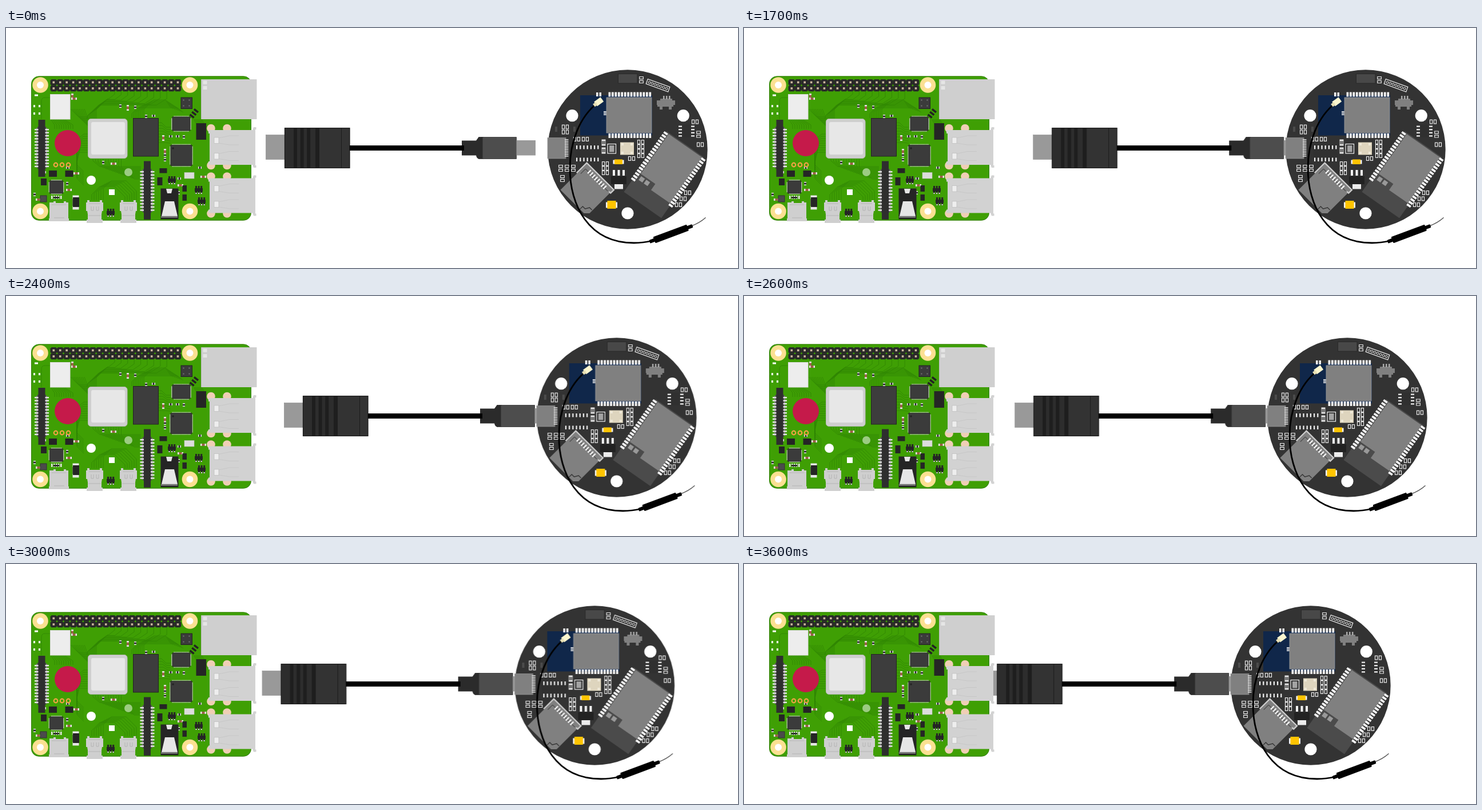
An HTML page for the animation above (5600 ms loop, 1280 by 421 pixels).

```html
<!DOCTYPE html>
<html lang="en">
<head>
<meta charset="utf-8">
<title>Connecting two boards</title>
<style>
html, body { margin: 0; width: 100%; height: 100%; overflow: hidden; background: #fff; }
svg { display: block; width: 100vw; height: 100vh; }
#cable { animation: cable 5600ms infinite; }
#round { animation: round 5600ms infinite; }
/* 6.4px every 100ms: the cable reaches the round board, then both slide left */
@keyframes cable {
  0% { transform: translateX(0); }
  17.85% { transform: translateX(0); animation-timing-function: steps(8, start); }
  32.14% { transform: translateX(51.2px); }
  39.28% { transform: translateX(51.2px); animation-timing-function: steps(15, start); }
  66.07%, 100% { transform: translateX(-44.8px); }
}
@keyframes round {
  0% { transform: translateX(0); }
  39.28% { transform: translateX(0); animation-timing-function: steps(15, start); }
  66.07%, 100% { transform: translateX(-96px); }
}
</style>
</head>
<body>
<svg viewBox="0 0 1280 421" preserveAspectRatio="none">
  <g id="cable"></g>
  <g id="pi"></g>
  <g id="round"></g>
</svg>
<script>
const dark = '#252525', chip = '#3b3b3b', grey = '#808080', metal = '#cfcfcf', white = '#f2f2f2';

const rect = (x, y, w, h, fill, more = '') =>
  `<rect x="${x}" y="${y}" width="${w}" height="${h}" fill="${fill}" ${more}/>`;
const disc = (x, y, r, fill, more = '') =>
  `<circle cx="${x}" cy="${y}" r="${r}" fill="${fill}" ${more}/>`;
const path = (d, fill, more = '') => `<path d="${d}" fill="${fill}" ${more}/>`;
const line = (d, color, width) => path(d, 'none', `stroke="${color}" stroke-width="${width}"`);
const edge = (color, width = 1) => `stroke="${color}" stroke-width="${width}"`;
const turn = (x, y, angle, body) =>
  `<g transform="translate(${x} ${y}) rotate(${angle})">${body}</g>`;
const rep = (n, f) => Array.from({ length: n }, (_, i) => f(i)).join('');
const pins = (x, y, n, dx, dy, w, h, fill) =>
  rep(n, i => rect(x + dx * i, y + dy * i, w, h, fill));
// Calls f on the four corners of a box
const corners = (x, y, w, h, f) => rep(4, i => f(x + (i % 2) * w, y + (i >> 1) * h));
const put = (id, parts) => { document.getElementById(id).innerHTML = parts.join(''); };

let seed = 7;
const random = () => (seed = seed * 16807 % 2147483647) / 2147483647;

/* ---- Cable ---- */
put('cable', [
  rect(454.5, 187.5, 34, 43, '#999', edge('#858585', .6)),
  rect(487.5, 175.5, 113.5, 70, '#333', edge('#161616', 1.2)),
  rect(488, 176, 60, 69, '#2d2d2d'),
  pins(503, 176, 3, 11.6, 0, 6, 69, '#1e1e1e'), rect(541, 176, 7, 69, '#1e1e1e'),
  line('M586.5 176v69', '#1c1c1c', 1),
  path('M797 197.5H822L826 192Q828 191 831 191H835V229.5H827Q823 229 822 223.5H797Z', '#2b2b2b'),
  rect(833.5, 191.5, 59, 38, '#4d4d4d'),
  line('M826 191.5H892.5V229.5H826', '#303030', .8),
  rect(601, 206, 200, 9, '#000'),
  rect(892.5, 197, 33.5, 26.5, '#999')
]);

/* ---- Green board ---- */
const traces = line(
  rep(9, i => `M${190 + i * 11.4} 112v${4 + i}l-${10 + i} ${8 + i * .4}H${178 - i * 2}L${158 - i * 2} ${143 + i * 1.4}V159`) +
  rep(8, i => `M${220 + i * 3} 158v-${8 + i}l${10 + i} -${10 + i}H${300 - i * 3}l10 ${8 + i}`) +
  rep(9, i => `M${79 + i * 3} 161l${6 + i} 9V177M${113 + i * 3} 142l14 ${14 + i * 3}H143`) +
  rep(12, i => `M${152 + i * 4.5} 230v${3 + i}l${12 + i} ${10 + i}H236`) +
  rep(9, i => `M143 ${186 + i * 4}H${136 - i}l-${12 - i} ${10 + i}V${240 + i * 3}l12 12`) +
  rep(8, i => `M267 ${166 + i * 5}h${5 + i}l8 ${8 - i}H288M${328 + i * 2} 160l14 22`) +
  rep(6, i => `M${150 + i * 4} 302v-${10 + i * 2}l14 -14H${190 + i * 4}l18 18V302`) +
  'M62 160V128Q62 122 68 122H77', '#2f8503', .75);

const header = rep(40, i => {
  const x = 77.6 + (i % 20) * 11.43, y = i < 20 ? 90 : 100.6;
  return path(`M${x + 2} ${y}h7.5l2.1 2.2v6.3l-2.1 2.2h-7.5l-2.1 -2.2v-6.3z`, '#292929') +
    rect(x + 3.9, y + 3.5, 3.6, 3.6, '#c9b59c');
});

// Chip with a row of legs on all four sides
const quad = (x, y, w, h, n) =>
  pins(x + 2.5, y - 2, n, (w - 4) / n, 0, 1.3, h + 4, '#ccc') +
  pins(x - 2, y + 2.5, n, 0, (h - 4) / n, w + 4, 1.3, '#ccc') +
  rect(x, y, w, h, chip, edge(dark, .8));

// Two-ended surface part
const smd = (x, y, w, h, fill) => rect(x, y, w, h, '#e6e6e6') +
  (w > h ? rect(x + w / 4, y, w / 2, h, fill) : rect(x, y + h / 4, w, h / 2, fill));

// A loose row or column of surface parts
const scatter = (x, y, n, dx, dy) => rep(n, i => {
  const brown = random() < .45, wide = random() < .5, w = brown ? 10 : 6;
  return smd(x + dx * i, y + dy * i, wide ? w : 4, wide ? 4 : w, brown ? '#9a6047' : '#333');
});

// Small black part with three legs above and below
const legs = (x, y) =>
  pins(x - 6, y - 7, 3, 4.6, 0, 3, 14, dark) + rect(x - 7, y - 3, 14, 6, dark) +
  pins(x - 5.6, y + 5, 3, 4.6, 0, 2.2, 2, '#ddd');

const ribbon = (x, y, h, barY, barH) =>
  rect(x + 3, y, 19, h, '#777') + rect(x + 5, y - 2, 15, h + 4, '#4a4a4a') +
  pins(x, y + 2, 13, 0, h / 13, 25, 2.4, '#e6e6e6') + rect(x + 6.5, barY, 12, barH, '#2e2e2e');

const usbPort = y =>
  corners(358.5, y + 2, 28, 65, (px, py) => disc(px, py, 7.3, '#efcfb5')) +
  path(`M354 ${y + 5}H431L433 ${y}H437.5V${y + 4}H436V${y + 67}H437.5V${y + 71}H433L431 ${y + 66}H354V${y + 60}H356V${y + 11}H354Z`, '#d2d2d2') +
  rep(2, i => {
    const top = y + 18 + i * 27.5;
    return line(`M372 ${top + 1}l19 -4h16M372 ${top + 10}l19 3h16`, '#c6c6c6', .9) +
      rect(364, top, 8, 10.5, '#eee', edge('#bbb', .7));
  });

const hdmiPort = x =>
  path(`M${x} 306h2v-4h4v3h18v-3h4v4h2v15h-2l-1 6v9h2v6h-28v-6h2v-9l-1 -6h-2z`, metal) +
  line(`M${x + 5} 308h20M${x + 9} 313v7h4v-7m5 0v7h4v-7M${x + 4} 329h22`, '#b0b0b0', .9);

put('pi', [
  rect(44.5, 84.8, 384, 252.5, '#3f9f04', 'rx="13" ' + edge('#2f7c03')),
  traces,
  corners(60, 100, 261.5, 221.5, (x, y) => disc(x, y, 13.8, '#fbe092') + disc(x, y, 6, '#fff')),
  header,
  rect(77.5, 116.5, 34.5, 43.5, '#ededed', edge('#dcdcdc')),
  rect(143.5, 159.5, 68.5, 69, metal, 'rx="5" ' + edge('#bcbcbc')),
  rect(149, 165, 59, 57, '#e7e7e7', 'rx="3"'),
  rect(222.5, 158.5, 44, 66.5, '#3d3d3d', edge('#222')),
  quad(291, 156, 31, 24, 12), quad(288, 205.5, 37, 36, 15),
  disc(292, 211, 1.8, '#222'),
  rect(306, 122, 19.5, 19.5, chip, edge('#222')),
  corners(309.5, 125.5, 10, 10, (x, y) => rect(x, y, 2, 2, '#777')),
  turn(330, 141, 38, pins(0, 0, 3, 0, 6, 9, 3.5, '#222')),

  // Small parts
  scatter(114, 115, 2, 0, 7), scatter(198, 134, 3, 13, 1), scatter(243, 152, 2, 12, 0),
  scatter(273, 188, 4, 12, 0), scatter(276, 212, 3, 0, 8), scatter(168, 233, 2, 15, 3),
  scatter(105, 243, 2, 13, 10), scatter(60, 251, 2, 16, 0), scatter(105, 270, 2, 0, 12),
  scatter(48, 289, 2, 4, 10), scatter(300, 262, 3, 0, 12), scatter(336, 243, 2, 4, 16),
  corners(48, 135, 9, 13, (x, y) => rect(x, y, 3, 4, '#fff')),
  rect(50, 116.5, 6, 3, '#fff'),
  pins(75, 250, 2, 28.5, 0, 14, 11, dark), rect(61, 264, 10, 12, dark),
  rect(60, 294, 11, 11, '#4b4b4b', edge('#333')),
  quad(76.5, 268, 23, 22, 10),
  pins(79, 294, 5, 4, 0, 2.5, 6, '#e6e6e6'), rect(83, 296, 10, 3, '#333'),
  smd(116.5, 293.5, 11, 25, dark), rect(117, 297, 11, 17, dark),
  rect(268.5, 246, 13, 8.5, dark), rect(264.5, 262, 9, 14, dark),
  pins(308.5, 276, 2, 0, 16, 7.5, 11, dark),
  rect(312, 253.5, 17, 10.5, '#ddd', edge('#c4c4c4', .6)),
  legs(290, 267), legs(337, 284), legs(342, 304), legs(183, 324),
  rep(3, i => disc(87 + i * 11, 240, 3.3, '#3f9f04', edge('#f0a244', 2.2))),

  // Plain shapes where printed marks stand
  disc(108, 202, 23, '#c51a4a'), disc(149, 267, 8, '#fff'),
  disc(214, 253, 7, '#9ccc82'), rect(180, 283, 10, 10, '#fff'),

  // Ports
  rect(332.5, 167, 17.5, 29, dark),
  rect(341, 90, 97.5, 70, metal), line('M341.5 90v70', '#b8b8b8', 1),
  pins(344.5, 92.5, 2, 0, 9.5, 7, 6, '#e6e6e6'),
  usbPort(174), usbPort(258.5),
  ribbon(50, 175, 70, 161, 100), ribbon(234.5, 249, 73, 233.5, 102.5),
  path('M76 306h7v-2h4v3h14v-3h4v2h4v28h1v5h-35v-5h1z', metal),
  line('M80 310h25M84 333h18', '#b5b5b5', 1),
  hdmiPort(140), hdmiPort(199),
  rect(270.5, 281.5, 31, 54, dark),
  path('M278 304h16l6 26h-28z', '#e6e6e6'), path('M280 282h11l-2 8h-7z', '#e6e6e6'),
  line('M271 331.5h29', '#bbb', 1.4)
]);

/* ---- Round board ---- */
const bracket = (x, y, tall) => turn(x, y, tall ? 90 : 0,
  line('M-1.4 -3.3H-5.5V3.3H-1.4ZM1.4 -3.3H5.5V3.3H1.4Z', '#e8e8e8', 1.2));
const brackets = (x, y, n, dx, dy, tall) => rep(n, i => bracket(x + dx * i, y + dy * i, tall));

const card =
  path('M0 0H65V58L58 65H0Z', grey) +
  line('M-1 24V-1H66V7H62', '#ccc', 2.4) +
  line('M5 8H60M5 8V20', '#444', 1) +
  pins(12, 3, 8, 5.5, 0, 2.4, 8, white) +
  line('M48 65V58H54L58 51H64', '#333', 1.3);

const radio =
  rect(0, 0, 80, 130, '#4b4b4b') +
  path('M6 2H77V100H37V87H6Z', grey) +
  pins(9, 90, 2, 11, 0, 8, 8, '#999') +
  rep(2, i => pins(-3 + i * 80, 2, 18, 0, 5.8, 8, 3.8, white));

put('round', [
  disc(1087, 213, 139.7, '#333'),
  disc(990, 153.7, 10.6, '#fff'), disc(1184.3, 153.7, 10.6, '#fff'), disc(1087, 325, 10.6, '#fff'),
  rect(1070.5, 80.5, 33.5, 16.5, '#484848', edge('#292929')),
  turn(1140, 100.7, 20, rect(-20.5, -4.5, 41, 9, '#333', edge(white, 1.2)) +
    rep(7, i => disc(-16 + i * 5.35, 0, 2, '#333', edge(white, .9)))),
  path('M1144 124h21v3h5v8h-3v3h-3v5h-5v-5h-11v5h-5v-5h-4v-3h-1v-8h6z', grey),
  pins(1149, 119, 3, 5, 0, 2.5, 6, '#aaa'),

  // Wireless module
  rect(1004, 118, 126, 70.5, '#10274a'),
  rep(2, i => pins(1053.5, 112.5 + i * 72.5, 14, 5.45, 0, 3.8, 8, white)),
  pins(1032, 113, 2, 5.5, 0, 3.5, 7, white),
  pins(1045, 146, 3, 0, 2.6, 6, 1.6, white),
  rect(1050, 122, 79, 62, grey, edge('#999', .8)),

  // Eight-leg and fourteen-leg chips
  pins(1176, 171.5, 4, 0, 5.6, 28, 2.2, white), rect(1182, 169.5, 16, 22, '#303030'),
  pins(997, 206, 7, 6.2, 0, 2.2, 28, white), rect(995.5, 212.5, 43, 15, '#303030'),

  // USB socket
  rect(947, 192.5, 32, 36.5, grey, edge('#999', .7)),
  pins(977, 195, 11, 0, 2.9, 6.5, 1.6, '#ddd'),
  pins(960, 173, 2, 32, 0, 4, 9, '#4b4b4b'),

  // Middle parts
  rep(2, i => smd(1041.5, 195.5 + i * 14, 7, 11, '#777')),
  rect(1052, 203.5, 14.5, 16.5, '#333', edge(white, 1.2)), rect(1055, 206, 8.5, 11.5, '#a3a3a3'),
  rect(1074, 200.5, 24, 22, '#ded5be'),
  corners(1076, 202, 16, 15, (x, y) => rect(x, y, 4, 4, '#efe9d9')),
  rect(1061.5, 231.5, 19, 7, white), rect(1064, 230.5, 14, 8.5, '#ffc400'),
  pins(1061, 249, 3, 8.5, 0, 4, 10, white),
  rect(1058, 260, 27, 14, '#222'), rect(1064, 274, 15, 8.5, '#ececec'),
  rect(1049, 305.5, 20, 10, white), rect(1051.5, 303, 15, 14, '#ffc400'),
  brackets(1110, 200, 4, 0, 8), brackets(1048, 238, 3, 0, 8), brackets(978, 173.5, 2, 0, 9),
  brackets(998, 195, 2, 15, 0), brackets(1192, 289, 3, -8, 10.5), brackets(1205, 164.5, 2, 9, 40),
  brackets(970, 246, 3, 11, 0, true),
  bracket(1094, 229), bracket(1111, 91, true), bracket(1211, 186.5, true), bracket(973, 264, true),

  turn(1015.5, 238, 45, card),
  turn(1155, 181, 35, radio),

  // Aerial
  line('M1035 131C1002 156 986 202 986 246C986 310 1018 377 1098 377Q1114 377 1131 373', '#000', 2.8),
  turn(1036, 130, -36, rect(-6, -5, 14, 9.5, '#fbf6cf') + rect(-10, -3, 6, 6, '#e9e1b5')),
  line('M1198 347.5Q1213 342 1223.5 332.5', '#555', 1.4),
  turn(1163, 361, -20.5, rect(-40, -3, 80, 6, '#000', 'rx="1"') +
    rect(-31.5, -5.8, 62.5, 11.6, '#000', 'rx="1.5"'))
]);
</script>
</body>
</html>
```
